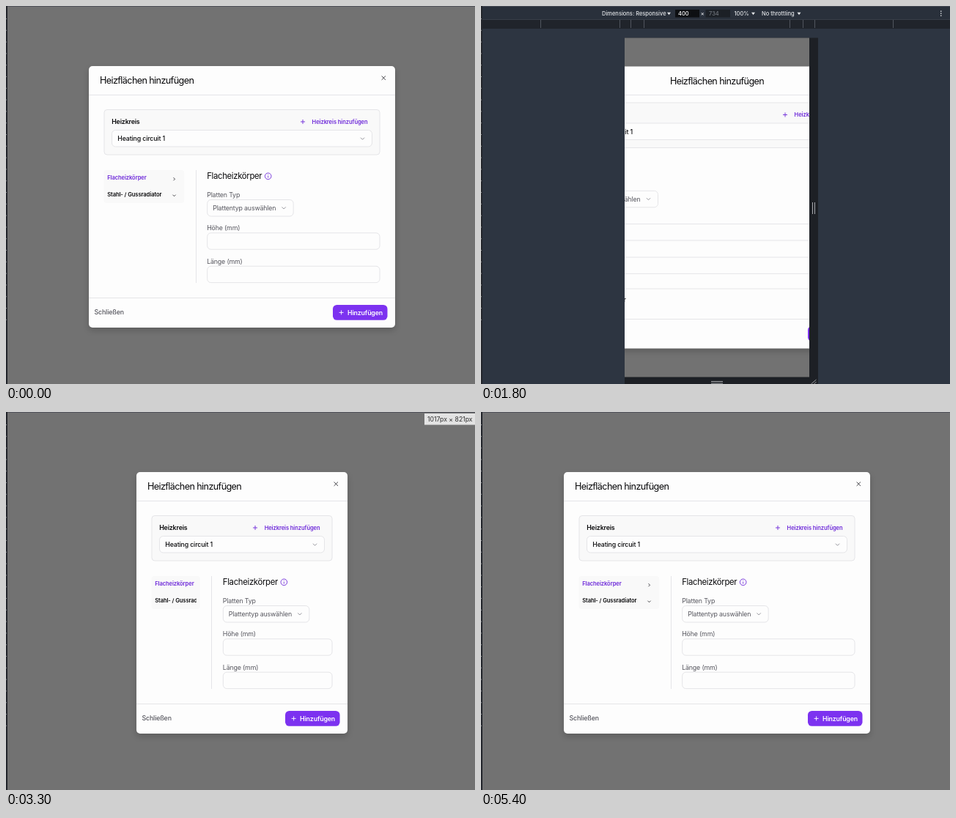
Write an HTML page with a canvas that moves like this. It is 640x516 px and loops after 5.6 s.

```html
<!DOCTYPE html>
<html lang="de">
<head>
<meta charset="utf-8">
<title>Responsive Dialog</title>
<style>
html, body { margin: 0; width: 100%; height: 100%; overflow: hidden; background: #727272; }
canvas { display: block; }
</style>
</head>
<body>
<canvas id="stage" width="640" height="516"></canvas>
<script>
const ctx = document.getElementById('stage').getContext('2d');
const LOOP = 5600, TICK = 100, EASE_MS = 200;
const WIDE = 418, SLIM = 231, CENTER = 322;
const GREY = '#727272', INK = '#09090b', MUTED = '#55555d', BORDER = '#e5e5e8';
const VIOLET = '#6d28d9', BUTTON = '#7c32f0', PAPER = '#fdfdfd';

function rect(x, y, w, h, fill) {
  ctx.fillStyle = fill;
  ctx.fillRect(x, y, w, h);
}

function panel(x, y, w, h, r, fill, stroke) {
  ctx.beginPath();
  ctx.roundRect(x, y, w, h, r);
  ctx.fillStyle = fill;
  ctx.fill();
  if (stroke) {
    ctx.strokeStyle = stroke;
    ctx.lineWidth = 1;
    ctx.stroke();
  }
}

function text(str, x, y, size, color, weight = 400, align = 'left', track = 0) {
  ctx.font = `${weight} ${size}px Inter, sans-serif`;
  ctx.letterSpacing = `${track * size}px`;
  ctx.textAlign = align;
  ctx.fillStyle = color;
  ctx.fillText(str, x, y);
}

const title = (x, y, align) => text('Heizflächen hinzufügen', x, y, 12.59, INK, 400, align, -0.047);
const body = (str, x, y, color, weight) => text(str, x, y, 8.81, color, weight, 'left', -0.017);
const small = (str, x, y, color, align) => text(str, x, y, 7.55, color, 600, align, -0.01);

// Each path is a flat list of x, y pairs relative to (x, y).
function lines(x, y, color, width, ...paths) {
  ctx.beginPath();
  for (const p of paths)
    for (let i = 0; i < p.length; i += 2)
      ctx[i ? 'lineTo' : 'moveTo'](x + p[i], y + p[i + 1]);
  ctx.strokeStyle = color;
  ctx.lineWidth = width;
  ctx.stroke();
}

const plus = (x, y, color) => lines(x, y, color, 0.9, [-3, 0, 3, 0], [0, -3, 0, 3]);
const chevron = (x, y, color, s = 2.6, dir = 1) =>
  lines(x, y, color, 0.9, [-s, -dir * s / 2, 0, dir * s / 2, s, -dir * s / 2]);

function clipTo(x, y, w, h, draw) {
  ctx.save();
  ctx.beginPath();
  ctx.rect(x, y, w, h);
  ctx.clip();
  draw();
  ctx.restore();
}

function leftEdge() {
  rect(0, 0, 2, 516, '#22252b');
  for (let y = 17; y < 432; y += 15.8) rect(0, y, 1, 1, '#8b8e94');
}

function modalShell(x, y, w, h, footY) {
  ctx.save();
  ctx.shadowColor = 'rgba(0,0,0,.18)';
  ctx.shadowBlur = 9;
  ctx.shadowOffsetY = 4;
  panel(x, y, w, h, 5, PAPER);
  ctx.restore();
  rect(x, 121, w, 1, BORDER);
  rect(x, footY, w, 1, BORDER);
  lines(x + w - 15.7, 98.2, '#333338', 0.9, [-2.7, -2.7, 2.7, 2.7], [2.7, -2.7, -2.7, 2.7]);
  body('Schließen', x + 7.5, footY + 23.4, MUTED, 500);
  const bx = x + w - 85;
  panel(bx, footY + 10, 74.5, 20.8, 5.5, BUTTON);
  plus(bx + 11.6, footY + 20.4, '#fff');
  body('Hinzufügen', bx + 20, footY + 23.5, '#fff', 600);
}

function circuitBox(x, y, w) {
  panel(x + .5, y + .5, w - 1, 61.5, 4, '#f9f9f9', BORDER);
  body('Heizkreis', x + 10.7, y + 20.2, INK, 600);
  small('Heizkreis hinzufügen', x + w - 17, y + 19.7, VIOLET, 'right');
  plus(x + w - 105.5, y + 17, VIOLET);
  panel(x + 11, y + 28.5, w - 22, 22.5, 5, PAPER, BORDER);
  body('Heating circuit 1', x + 18.8, y + 43.1, INK, 500);
  chevron(x + w - 24, y + 40, '#8c8c92');
}

function formFields(x, y, w) {
  body('Platten Typ', x, y, MUTED);
  panel(x + .5, y + 3.5, 117.5, 22.5, 5, PAPER, BORDER);
  body('Plattentyp auswählen', x + 8, y + 17.7, MUTED);
  chevron(x + 105, y + 14.7, '#8c8c92');
  ['Höhe (mm)', 'Länge (mm)'].forEach((label, i) => {
    const fy = y + 45.4 * (i + 1);
    body(label, x, fy, MUTED);
    panel(x + .5, fy + 3.4, w - 1, 22.4, 5, PAPER, BORDER);
  });
}

function infoIcon(x, y) {
  ctx.beginPath();
  ctx.arc(x, y, 4.3, 0, 7);
  ctx.strokeStyle = VIOLET;
  ctx.lineWidth = 0.9;
  ctx.stroke();
  lines(x, y, VIOLET, 0.9, [0, -.3, 0, 2.2], [0, -2.3, 0, -1.5]);
}

function desktop(w, badge) {
  rect(0, 0, 640, 516, GREY);
  rect(0, 0, 640, 1, '#50515a');
  leftEdge();
  const x = CENTER - w / 2, inner = w - 41, left = x + 20.5;
  const side = inner / 3 - 16, main = left + side + 31;
  modalShell(x, 82, w, 357, 398);
  title(x + 15, 106);
  circuitBox(left, 141, inner);

  panel(left, 224, side, 45, 4, '#f9f9f9');
  clipTo(left, 224, side - 5, 45, () => {
    small('Flacheizkörper', left + 4.7, 237.3, VIOLET);
    small('Stahl- / Gussradiator', left + 4.7, 260, INK);
    lines(left + 96, 236.2, '#333338', 0.9, [-1, -2, 1, 0, -1, 2]);
    chevron(left + 96, 258.7, '#333338', 2);
  });
  rect(Math.round(left + side + 15.5), 224, 1, 154, BORDER);

  text('Flacheizkörper', main, 236, 11.33, INK, 400, 'left', -0.028);
  infoIcon(main + 83.5, 232.3);
  formFields(main, 261, left + inner - main);
  if (badge) {
    rect(571, 2, 69, 15.5, '#e3e3e3');
    text('1017px × 821px', 575, 13, 8.7, '#303030');
  }
}

function toolbar(rotateIcon) {
  const light = '#e3e5e8';
  const label = (str, x, color = light) => text(str, x, 12.8, 7.5, color, 500);
  const arrow = x => {
    ctx.beginPath();
    ctx.moveTo(x - 2.5, 8.7);
    ctx.lineTo(x + 2.5, 8.7);
    ctx.lineTo(x, 12.2);
    ctx.fillStyle = light;
    ctx.fill();
  };
  rect(0, 0, 640, 18, '#29303b');
  rect(0, 0, 640, 1, '#454a55');
  rect(0, 18, 640, 13, '#20242b');
  rect(0, 18, 640, 1, '#383e48');
  for (const x of [81, 189, 204, 222, 421, 439, 455, 562]) rect(x, 19, 1, 11, '#50555e');
  label('Dimensions: Responsive', 165);
  arrow(256.5);
  rect(265, 5, 33, 10.5, '#0d0f12');
  label('400', 269, '#fff');
  label('×', 299.7);
  rect(306.5, 5, 33.5, 10.5, '#1c2026');
  label('734', 311, '#71767e');
  label('100%', 345.5);
  arrow(371.5);
  label('No throttling', 383);
  arrow(434);
  for (const y of [6.5, 9.5, 12.5]) rect(627, y, 1.4, 1.4, light);
  if (!rotateIcon) return;
  ctx.save();
  ctx.translate(449.5, 9.7);
  ctx.rotate(-Math.PI / 4);
  ctx.strokeStyle = light;
  ctx.lineWidth = 0.8;
  ctx.strokeRect(-1.8, -3.3, 3.6, 6.6);
  ctx.beginPath();
  ctx.arc(0, 0, 5, -1.2, .5);
  ctx.moveTo(-1.8, 4.7);
  ctx.arc(0, 0, 5, 1.94, 3.64);
  ctx.stroke();
  ctx.restore();
}

function mobileModal(w) {
  const x = CENTER - w / 2, left = x + 10.5, inner = w - 21;
  modalShell(x, 82.5, w, 385, 427);
  title(CENTER, 106.8, 'center');
  circuitBox(left, 131.5, inner);
  small('Flacheizkörper', left, 221.5, VIOLET);
  chevron(left + inner - 5, 220, '#55555c', 2.6, -1);
  formFields(left, 248.8, inner);
  rect(left, 385.5, inner, 1, BORDER);
  small('Stahl- / Gussradiator', left, 404, INK);
  chevron(left + inner - 5, 402.5, '#55555c');
}

function mobile(w, rotateIcon) {
  rect(0, 0, 640, 516, '#2d3541');
  toolbar(rotateIcon);
  leftEdge();
  rect(196, 43.5, 264, 473, '#1d2025');
  rect(196, 43.5, 252, 463, GREY);
  clipTo(196, 43.5, 252, 463, () => mobileModal(w));
  const grip = '#a6a8ac';
  rect(452, 268, 1, 16, grip);
  rect(455, 268, 1, 16, grip);
  rect(314, 512, 16, 1, grip);
  rect(314, 514.5, 16, 1, grip);
  lines(450, 510, grip, 0.9, [0.5, 6, 7.5, 0], [4.5, 6, 7.5, 3]);
}

// cubic-bezier(.4, 0, .2, 1), solved by bisection
function ease(t) {
  if (t <= 0 || t >= 1) return t <= 0 ? 0 : 1;
  let lo = 0, hi = 1, s;
  for (let i = 0; i < 20; i++) {
    s = (lo + hi) / 2;
    const x = 1.2 * s * (1 - s) ** 2 + 0.6 * s * s * (1 - s) + s ** 3;
    x < t ? lo = s : hi = s;
  }
  return 3 * s * s * (1 - s) + s ** 3;
}

function frame(now) {
  const t = Math.floor(Math.max(0, now - start) % LOOP / TICK) * TICK;
  const grow = from => ease((t - from) / EASE_MS);
  ctx.clearRect(0, 0, 640, 516);
  if (t >= 1800 && t < 3300) mobile(WIDE + (SLIM - WIDE) * grow(1800), t >= 1900);
  else if (t >= 3300) desktop(SLIM + (WIDE - SLIM) * grow(3244.6), t < 4300);
  else desktop(WIDE, false);
  requestAnimationFrame(frame);
}

const start = performance.now();
frame(start);
</script>
</body>
</html>
```
